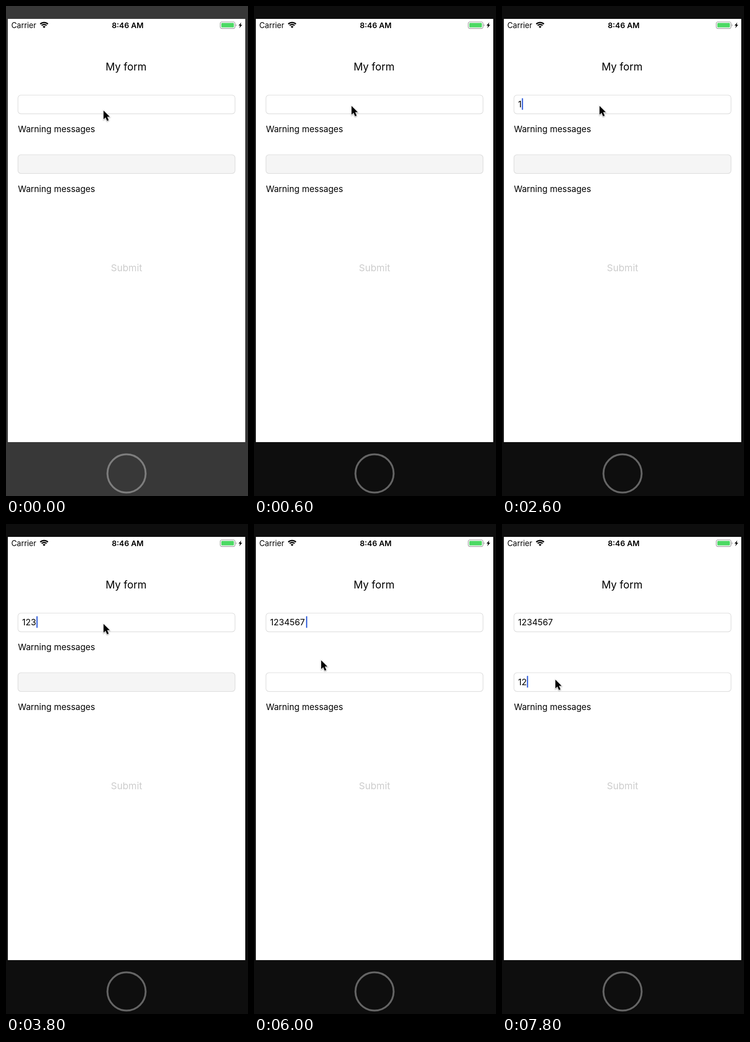
An HTML page for the animation above (8 s loop, 526 px wide and 1064 px high).

```html
<!DOCTYPE html>
<html lang="en">
<head>
<meta charset="utf-8">
<title>My form</title>
<style>
html, body { margin: 0; width: 100%; height: 100%; overflow: hidden; }
svg { display: block; width: 526px; height: 1064px; }
text { font: 18.6px Inter, Roboto, sans-serif; }
.field { stroke: #d9d9d9; stroke-width: 1.2; }
.middle { text-anchor: middle; }
</style>
</head>
<body>
<svg viewBox="0 0 526 1064">
  <rect id="bezel" width="526" height="1064"/>
  <rect x="4" y="28" width="516" height="919" fill="#fff"/>
  <circle id="home" cx="262" cy="1015" r="41.5" fill="none" stroke-width="4"/>

  <!-- status bar -->
  <text x="11.5" y="48" style="font-size:16.6px">Carrier</text>
  <g fill="none" stroke="#000" stroke-width="2.9">
    <path d="M74.5 39.2A12 12 0 0 1 91.1 39.2"/>
    <path d="M77.5 42.3A7.6 7.6 0 0 1 88.1 42.3"/>
    <path d="M82.8 48L79.7 44.8A4.4 4.4 0 0 1 85.9 44.8Z" fill="#000" stroke="none"/>
  </g>
  <text class="middle" x="264.5" y="48" style="font-size:16.6px;font-weight:600">8:46 AM</text>
  <rect x="465.6" y="34.5" width="32.2" height="14.4" rx="3.6" fill="none" stroke="#8c8c8c" stroke-width="1.2"/>
  <rect x="468" y="36.8" width="27.4" height="9.8" rx="1.6" fill="#4cd964"/>
  <path d="M499.6 39.2Q502.4 41.7 499.6 44.2Z" fill="#8c8c8c"/>
  <path d="M511.4 35.6L505.4 42.6H508.8L507 48.2L513.4 40.7H509.9Z"/>

  <text class="middle" x="261" y="140" style="font-size:22.5px">My form</text>
  <rect class="field" x="26" y="193.5" width="471.8" height="40.7" rx="6.5" fill="#fff"/>
  <text id="first" x="35" y="220"/>
  <text id="warning" x="26" y="274">Warning messages</text>
  <rect id="field2" class="field" x="26" y="323" width="471.8" height="40.7" rx="6.5"/>
  <text id="second" x="35" y="349.5"/>
  <text x="26" y="403.5">Warning messages</text>
  <text class="middle" x="262" y="575.5" fill="#cdcdcd" style="font-size:20.6px">Submit</text>

  <rect id="caret" width="2.8" height="25.4" rx=".8" fill="#426bde"/>
  <path id="pointer" d="M0 0V19L4.4 15L7.7 22.5L11.2 21L7.9 13.6H13.6Z" stroke="#fff" stroke-width="2"
    paint-order="stroke" style="filter:drop-shadow(0 1.5px 1.2px #0006)"/>
</svg>
<script>
const LOOP = 8000, STEP = 200;
const el = Object.fromEntries([...document.querySelectorAll('[id]')].map(e => [e.id, e]));

const keys1 = [2600, 3600, 3800, 4200, 4600, 5000, 5400];
const keys2 = [7400, 7800];
const caretX = [35, 43, 54, 66, 79, 91, 102, 113];
const pointerStops = [[0, 212, 227], [400, 212, 217], [6000, 146, 296], [6200, 116, 338]];
const FOCUS1 = 1200, VALID = 4800, FOCUS2 = 6400;

const typed = (keys, t) => '1234567'.slice(0, keys.filter(k => k <= t).length);
const lastBefore = (times, t) => Math.max(...times.filter(k => k <= t));

// Solid while fresh, then fades out and back in once a second.
function blink(age) {
  const phase = age % 1000;
  return phase < 400 ? 1 : phase < 600 ? 0.5 : phase < 800 ? 0 : 0.5;
}

function draw(t) {
  const active = t >= 600;
  el.bezel.setAttribute('fill', active ? '#0e0e0e' : '#383838');
  el.home.setAttribute('stroke', active ? '#646464' : '#7d7d7d');

  const first = typed(keys1, t), second = typed(keys2, t);
  el.first.textContent = first;
  el.second.textContent = second;
  el.warning.style.opacity = t < VALID ? 1 : 0;
  el.field2.setAttribute('fill', t < VALID ? '#f5f5f5' : '#fff');

  const inSecond = t >= FOCUS2;
  const value = inSecond ? second : first;
  el.caret.setAttribute('x', caretX[value.length]);
  el.caret.setAttribute('y', inSecond ? 329.8 : 200.2);
  const age = t - lastBefore([FOCUS1, ...keys1], t);
  el.caret.style.opacity = t < FOCUS1 ? 0 : t < 4200 ? blink(age) : 1;

  const [, x, y] = pointerStops.filter(p => p[0] <= t).pop();
  el.pointer.setAttribute('transform', `translate(${x} ${y})`);
}

const start = performance.now();
function frame() {
  const t = (performance.now() - start) % LOOP;
  draw(Math.floor(t / STEP) * STEP);
  requestAnimationFrame(frame);
}
frame();
</script>
</body>
</html>
```
